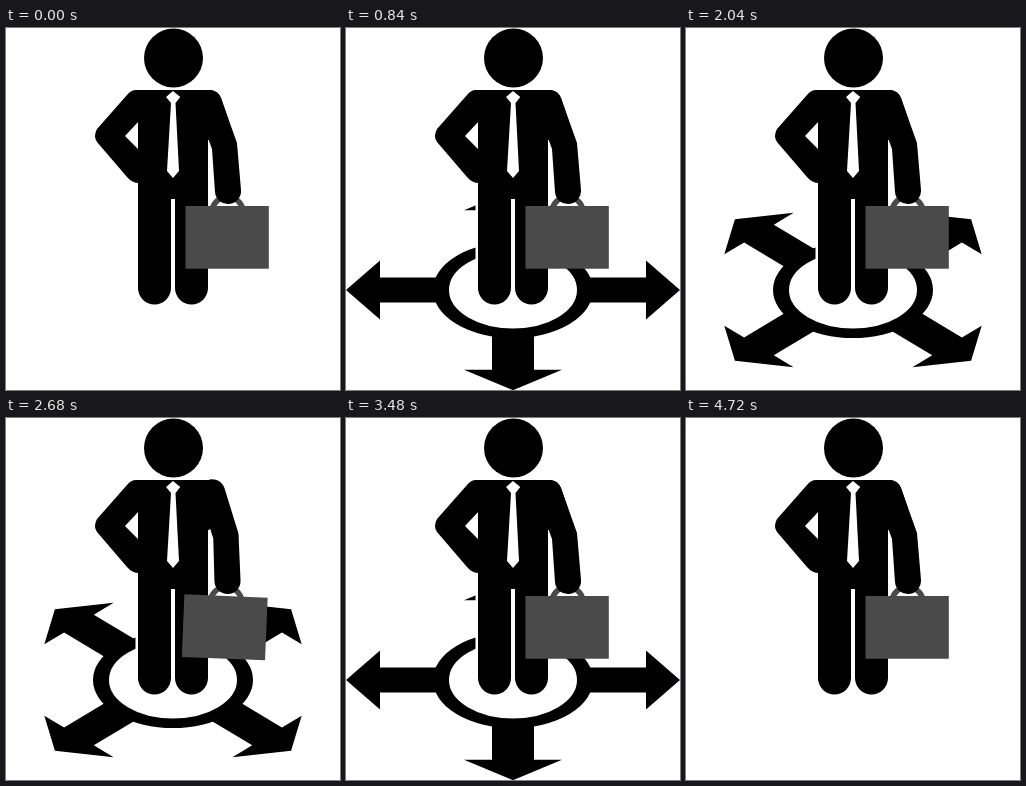
An HTML page that plays this animation: 334 by 362 pixels, repeating every 4.8 s.

```html
<!DOCTYPE html>
<html lang="en">
<head>
<meta charset="utf-8">
<title>Businessman and directions</title>
<style>
html, body { margin: 0; width: 100%; height: 100%; overflow: hidden; background: #fff; }
svg { display: block; width: 100%; height: 100%; }
</style>
</head>
<body>
<svg viewBox="0 0 334 362">
  <defs>
    <path id="arrow" d="M0-21H133V-49L167 0L133 49V21H0Z"/>
    <path id="body" d="M132 62H202V260A16.5 16.5 0 0 1 169 260V171H165V260A16.5 16.5 0 0 1 132 260Z"/>
  </defs>
  <g transform="translate(167 262) scale(1 .6)">
    <g id="arrows">
      <use href="#arrow"/>
      <use href="#arrow" transform="rotate(90)"/>
      <use href="#arrow" transform="rotate(180)"/>
      <use href="#arrow" transform="rotate(270)"/>
    </g>
    <circle id="ring" r="72" fill="#fff" stroke="#000" stroke-width="16"/>
  </g>
  <use href="#body" fill="#fff" stroke="#fff" stroke-width="5"/>
  <path d="M165 170H169V262H165Z" fill="#fff"/>
  <circle cx="167.5" cy="30" r="29.5"/>
  <use href="#body"/>
  <path d="M132 62H130Q125 62 121 67L91 101Q87 108 91 114L121 149Q126 155 133 155V122L119 108L133 93Z"/>
  <path d="M200 62H205Q212 63 215 70L222 91L203 112H198Z"/>
  <g id="swing">
    <path d="M206 182A15.7 15.7 0 0 1 237 182" fill="none" stroke="#4a4a4a" stroke-width="5.5"/>
    <path d="M200 62H205Q212 63 215 70L231 115L235 162A13 13 0 0 1 209 164L206 121L202 110Z"/>
    <rect x="179.5" y="178" width="83.3" height="62.7" fill="#4a4a4a"/>
  </g>
  <path d="M167 63L174.3 69L169.5 75L173 143L167 150L161 143L165 75L160 69Z" fill="#fff"/>
</svg>
<script>
const LOOP = 4800, STEP = 40;
const get = id => document.getElementById(id);
const arrows = get('arrows'), ring = get('ring'), swing = get('swing');
const span = (t, start, length) => Math.min(1, Math.max(0, (t - start) / length));
const easeOut = p => 1 - (1 - p) * (1 - p);

function draw(t) {
  const turn = 45 * (easeOut(span(t, 1555, 485)) - easeOut(span(t, 2995, 485)));
  const arrowSize = span(t, 40, 800) - span(t, 4160, 600);
  const ringSize = easeOut(span(t, 60, 260)) - span(t, 4500, 220);
  const tilt = -2.5 * Math.sin(2 * Math.PI * span(t, 2120, 800));
  arrows.setAttribute('transform', `rotate(${turn}) scale(${arrowSize})`);
  arrows.style.display = ringSize > 0.99 ? '' : 'none';
  ring.setAttribute('transform', `scale(${ringSize})`);
  swing.setAttribute('transform', `rotate(${tilt} 221.5 151)`);
}

const start = performance.now();
function tick() {
  const t = (performance.now() - start) % LOOP;
  draw(t - t % STEP);
  requestAnimationFrame(tick);
}
tick();
</script>
</body>
</html>
```
